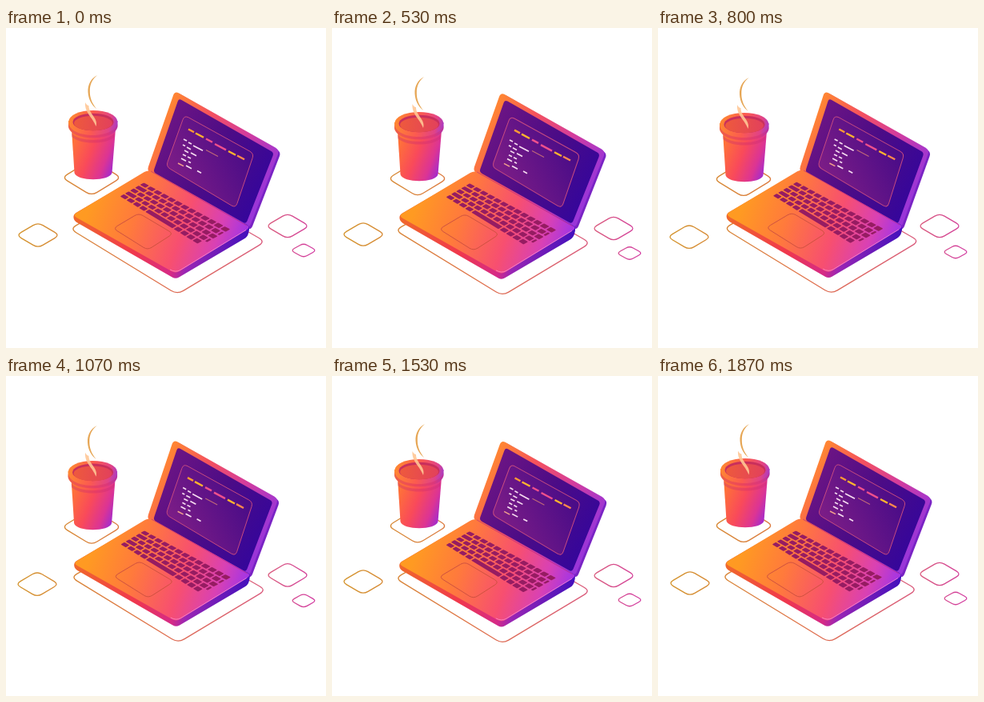
Animation, 400 px wide and 400 px high, one loop 1.94 s. Source, as an HTML page:

```html
<!DOCTYPE html>
<html lang="en">
<head>
<meta charset="utf-8">
<title>Laptop and coffee</title>
<style>
html, body { margin: 0; width: 100%; height: 100%; overflow: hidden; background: #fff; }
svg { display: block; width: 100vw; height: 100vh; }
</style>
</head>
<body>
<svg id="stage" viewBox="0 0 400 400">
  <defs>
    <linearGradient id="line" gradientUnits="userSpaceOnUse" x1="16" y1="240" x2="386" y2="270">
      <stop offset="0" stop-color="#d3932b"/><stop offset=".45" stop-color="#df7045"/>
      <stop offset=".85" stop-color="#d9587f"/><stop offset="1" stop-color="#d23ba0"/>
    </linearGradient>
    <linearGradient id="deck" gradientUnits="userSpaceOnUse" x1="108" y1="212" x2="290" y2="275">
      <stop offset="0" stop-color="#ff9a22"/><stop offset=".3" stop-color="#ff7a3c"/>
      <stop offset=".62" stop-color="#f74f70"/><stop offset=".85" stop-color="#d941b4"/>
      <stop offset="1" stop-color="#a936e0"/>
    </linearGradient>
    <linearGradient id="edge" gradientUnits="userSpaceOnUse" x1="87" y1="240" x2="302" y2="262">
      <stop offset="0" stop-color="#f0662c"/><stop offset=".35" stop-color="#f0384c"/>
      <stop offset=".58" stop-color="#d62a86"/><stop offset=".66" stop-color="#9a26b4"/>
      <stop offset="1" stop-color="#4410bc"/>
    </linearGradient>
    <linearGradient id="lid" gradientUnits="userSpaceOnUse" x1="190" y1="125" x2="325" y2="200">
      <stop offset="0" stop-color="#ff8434"/><stop offset=".3" stop-color="#f5525c"/>
      <stop offset=".65" stop-color="#d43c9c"/><stop offset="1" stop-color="#9a35d8"/>
    </linearGradient>
    <linearGradient id="screen" gradientUnits="userSpaceOnUse" x1="195" y1="130" x2="320" y2="205">
      <stop offset="0" stop-color="#6a1484"/><stop offset=".5" stop-color="#4c0c86"/>
      <stop offset="1" stop-color="#36069a"/>
    </linearGradient>
    <linearGradient id="pane" gradientUnits="userSpaceOnUse" x1="215" y1="190" x2="300" y2="150">
      <stop offset="0" stop-color="#7a1c86"/><stop offset="1" stop-color="#4a0c88"/>
    </linearGradient>
    <linearGradient id="cup" gradientUnits="userSpaceOnUse" x1="82" y1="142" x2="138" y2="164">
      <stop offset="0" stop-color="#ff7436"/><stop offset=".45" stop-color="#f94a5a"/>
      <stop offset=".8" stop-color="#dc3494"/><stop offset="1" stop-color="#a82cc8"/>
    </linearGradient>
    <linearGradient id="rim" gradientUnits="userSpaceOnUse" x1="78" y1="110" x2="139" y2="124">
      <stop offset="0" stop-color="#ff8a30"/><stop offset=".5" stop-color="#fb5a50"/>
      <stop offset=".85" stop-color="#e04288"/><stop offset="1" stop-color="#a63cc8"/>
    </linearGradient>
    <linearGradient id="mouth" gradientUnits="userSpaceOnUse" x1="84" y1="116" x2="134" y2="120">
      <stop offset="0" stop-color="#ee5a3c"/><stop offset="1" stop-color="#e2405c"/>
    </linearGradient>
  </defs>
</svg>
<script>
const stage = document.getElementById('stage');

function add(parent, tag, attrs) {
  const el = document.createElementNS('http://www.w3.org/2000/svg', tag);
  for (const name in attrs) el.setAttribute(name, attrs[name]);
  return parent.appendChild(el);
}
const group = () => add(stage, 'g', {});
const path = (g, d, attrs) => add(g, 'path', { d, ...attrs });
const stroke = (color, width) => ({ fill: 'none', stroke: color, 'stroke-width': width });

// Closed polygon with corners cut at distance r and curved
function rounded(pts, r) {
  const toward = (a, b) => {
    const k = Math.min(.45, r / Math.hypot(b[0] - a[0], b[1] - a[1]));
    return [a[0] + (b[0] - a[0]) * k, a[1] + (b[1] - a[1]) * k];
  };
  return pts.map((p, i) => {
    const from = toward(p, pts.at(i - 1));
    const to = toward(p, pts[(i + 1) % pts.length]);
    return `${i ? 'L' : 'M'}${from}Q${p} ${to}`;
  }).join('') + 'Z';
}
const diamond = (x, y, w, h, r) => rounded([[x - w, y], [x, y - h], [x + w, y], [x, y + h]], r);

const outline = stroke('url(#line)', 1.3);
const plate = group(), tileLeft = group(), tileRight = group(), tileSmall = group();
const coaster = group(), cup = group(), steamTop = group(), steamLow = group();
const lid = group(), base = group();

path(plate, rounded([[80, 251], [190, 190], [324, 267], [214, 333]], 9), outline);
path(tileLeft, diamond(40, 259, 27, 16, 7), outline);
path(tileRight, diamond(352, 247.5, 27, 16, 7), outline);
path(tileSmall, diamond(372, 278, 16, 9, 5), outline);
path(coaster, diamond(107, 187, 37, 22.5, 8), outline);

function drawCup(g) {
  path(g, 'M82 126L85.5 181C88 192 130 192 132.5 181L137 126Z', { fill: 'url(#cup)' });
  path(g, 'M82 131C90 143 128 143 136 131L135.6 136C126 146 92 146 82.4 136Z',
    { fill: '#c82a70', opacity: .35 });
  path(g, 'M78 116V123C80 142 137 142 139.500 123V116Z', { fill: 'url(#rim)' });
  path(g, 'M78 119C82 139 135 139 139.500 119V123C137 142 80 142 78 123Z',
    { fill: '#d42a68', opacity: .4 });
  add(g, 'ellipse', { cx: 108.8, cy: 117, rx: 30.6, ry: 14, fill: 'url(#rim)' });
  add(g, 'ellipse', { cx: 109, cy: 117.500, rx: 25.500, ry: 10.800, fill: '#c92f5c' });
  add(g, 'ellipse', { cx: 109, cy: 119, rx: 24, ry: 9.300, fill: 'url(#mouth)' });
}

function drawSteam() {
  path(steamTop, 'M114 59C106 63 102 71 102.500 80C103 90 108 97 113 101C107 93 104.800 87 104.800 79C104.800 70 108 64 114 59Z',
    { fill: '#e6a655' });
  path(steamLow, 'M99 93C98 106 108 111 112.500 123C116 113 103 107 103.500 97Q101 97 99 93Z',
    { fill: '#ffc795', opacity: .9 });
}

// Screen rows run along the slope of the lid
function dash(g, x, y, len, color, width) {
  path(g, `M${x} ${y}l${len} ${len * .53}`, stroke(color, width));
}

function drawLid(g) {
  path(g, rounded([[213, 80], [344, 155], [306, 253], [178, 181]], 6), { fill: '#7a24c4' });
  path(g, rounded([[211, 78.500], [342, 152.500], [304, 250], [176, 179]], 6), { fill: 'url(#lid)' });
  path(g, rounded([[216, 88], [335, 156], [300, 245], [184, 180]], 4), { fill: 'url(#screen)' });
  path(g, rounded([[223, 109], [310, 157], [287, 225], [200, 173]], 6),
    { fill: 'url(#pane)', stroke: '#c64a80', 'stroke-width': 1 });

  const gold = '#ffb52e', pink = '#f0508c', white = '#f6dcf0';
  [[228, 126.500, 7, '#ff9a34'], [237, 131.500, 10, gold], [250, 138.500, 8, pink],
   [261, 145, 14, pink], [278, 154, 9, gold], [289, 159.500, 9, '#ff8a4c']]
    .forEach(([x, y, len, color]) => dash(g, x, y, len, color, 2.4));
  [[222, 139, 4], [228, 143, 4], [234, 147, 12], [221, 146, 3], [226, 149, 5],
   [223, 153, 5], [231, 156, 7], [221, 158, 4], [227, 161, 4], [219, 163, 6],
   [228, 167, 3], [225, 172, 7], [239, 178.500, 5]]
    .forEach(([x, y, len]) => dash(g, x, y, len, white, 1.7));
  dash(g, 250, 152.500, 15, '#c06a78', 1.1);
  dash(g, 215, 169, 7, '#f2a08c', 1.5);
}

function drawKeys(g) {
  const mix = (a, b, k) => [a[0] + (b[0] - a[0]) * k, a[1] + (b[1] - a[1]) * k];
  const at = (u, v) => mix(mix([172, 192.500], [282, 251.500], u), mix([141, 210.500], [243, 273], u), v);
  const key = (c, row, span) => {
    const u0 = (c + .1) / 13, u1 = (c + span - .1) / 13;
    const v0 = (row + .12) / 5, v1 = (row + .86) / 5;
    return rounded([at(u0, v0), at(u1, v0), at(u1, v1), at(u0, v1)], 1);
  };
  let d = '';
  for (let row = 0; row < 4; row++) {
    const first = 1 + row % 2 * .5;
    d += key(0, row, first);
    for (let c = first; c < 12; c++) d += key(c, row, Math.min(1, 13 - c));
    d += key(first + Math.ceil(12 - first), row, 13 - first - Math.ceil(12 - first));
  }
  for (const [c, span] of [[0, 1], [1, 1], [2, 1], [3, 1], [4, 4.500], [8.500, 1], [9.500, 1], [10.500, 1], [11.500, 1]])
    d += key(c, 4, span);
  path(g, d, { fill: '#961c62' });
}

function drawBase(g) {
  path(g, rounded([[84, 233], [178, 178], [305, 248], [302, 261], [212, 314], [85, 241]], 5), { fill: 'url(#edge)' });
  path(g, rounded([[83, 234], [178, 177], [306, 249], [212, 307]], 6), { fill: 'url(#deck)' });
  path(g, 'M205 302Q212 306 218 302.500L300 252.500', { ...stroke('#ff8fd0', 1), opacity: .75 });
  path(g, 'M181 179L301 247', { ...stroke('#b82a78', 1), opacity: .6 });
  drawKeys(g);
  path(g, rounded([[134, 250.500], [166, 231.500], [209, 257], [177, 277.500]], 6), stroke('#cf5140', 1));
}

drawCup(cup);
drawSteam();
drawLid(lid);
drawBase(base);

// Offsets at the key steps below; the last pose closes the loop
const LOOP = 1940, LAST = 28;
const keySteps = [0, 4, 8, 12, 19, 23, LAST];
const still = [0, 0];
const shift = (x, y) => `translate(${x} ${y})`;

// Tilts the lid about its hinge: the top edge moves by (x, y)
function tilt(x, y) {
  const a = .004803, b = -.008576, c = .6717;
  return `matrix(${1 + a * x} ${a * y} ${b * x} ${1 + b * y} ${c * x} ${c * y})`;
}

const moves = [
  [plate, shift, [still, [-1, 1], [-1, 1.7], [2.500, -.5], [0, 1.2], [-1, 1.7], still]],
  [tileLeft, shift, [still, [-1, -2], [-1, -1], [-1, 2.200], [-1, .5], [-1, -2], still]],
  [tileRight, shift, [still, [0, 1.5], [0, 3], [0, 0], [0, 2.500], [0, 2], still]],
  [tileSmall, shift, [still, [0, 1.7], [0, 3.500], [0, 2], [0, 3.500], [0, 2], still]],
  [coaster, shift, [still, still, [0, 1.2], [0, 2], [0, 1.5], [0, .4], still]],
  [cup, shift, [still, [0, .4], [0, 2], [-1, 3], [0, 2.800], [0, 1], still]],
  [steamTop, shift, [still, [2, 0], [1, 2], [-.5, 3], [-.5, 3], [2, 1], [0, 1]]],
  [steamLow, shift, [still, [2, -.5], [1.5, 2], [0, 3], [0, 2.500], [1.5, 1], [1, .5]]],
  [lid, tilt, [still, [1, 1.5], [0, 1.7], [-2.500, 0], [-.7, 1.7], [.8, 1.5], still]],
  [base, shift, [still, [0, .6], [0, .9], [1.2, -.8], [.4, .6], [-.2, .8], still]]
];

function draw(now) {
  const tick = Math.floor(now % LOOP / 10);
  const step = Math.min(LAST, Math.floor((tick + .5) * 3 / 20));
  let i = 0;
  while (i < keySteps.length - 2 && step >= keySteps[i + 1]) i++;
  const k = (step - keySteps[i]) / (keySteps[i + 1] - keySteps[i]);
  for (const [part, transform, poses] of moves) {
    const [x, y] = poses[i].map((from, axis) => from + (poses[i + 1][axis] - from) * k);
    part.setAttribute('transform', transform(x, y));
  }
}

const start = performance.now();
function loop() {
  draw(performance.now() - start);
  requestAnimationFrame(loop);
}
loop();
</script>
</body>
</html>
```
